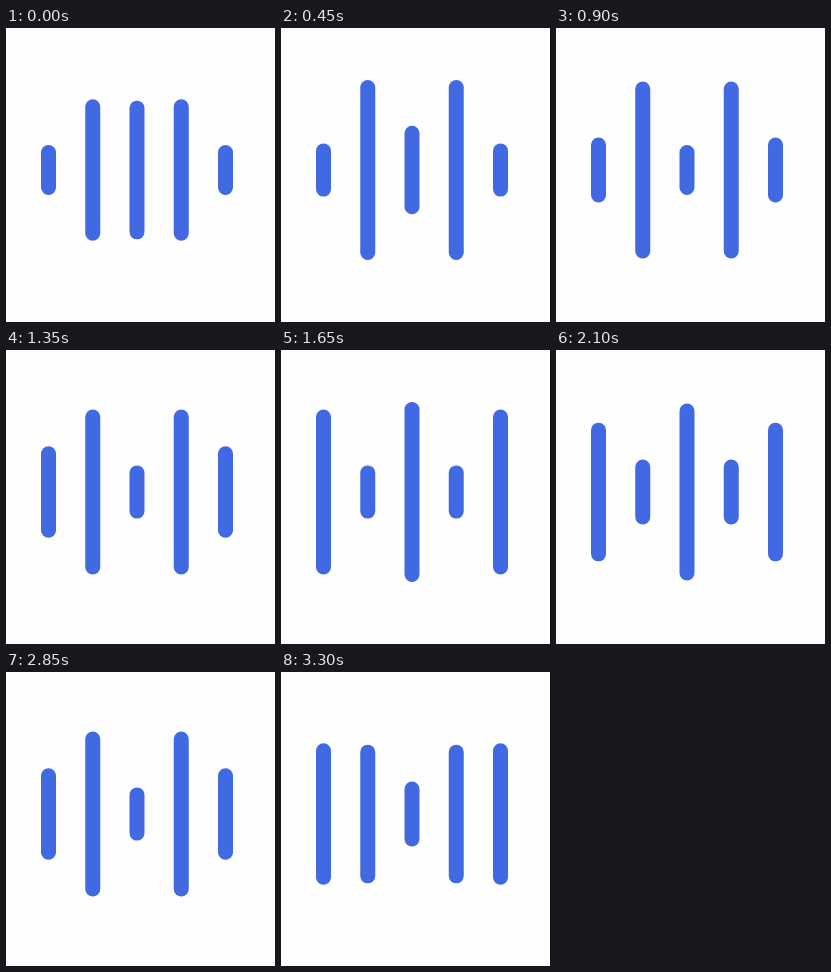
An HTML page that plays this animation: 269x294 px, repeating every 3320 ms.

```html
<!DOCTYPE html>
<html lang="en">
<head>
<meta charset="utf-8">
<title>Audio bars</title>
<style>
  html, body { margin: 0; width: 100%; height: 100%; overflow: hidden; background: #fefefe; }
  svg { display: block; }
  rect { fill: #4169e1; }
</style>
</head>
<body>
<svg id="stage" width="269" height="294" viewBox="0 0 269 294"></svg>
<script>
  const LOOP = 3320, STEP = 150, PERIOD = 500;
  const MIN = 50, MAX = 180, MID = 142, WIDTH = 15, LEFT = 35, GAP = 44.25;
  const DELAYS = [750, 450, 150, 450, 750];

  // The CSS "ease" curve, cubic-bezier(.25, .1, .25, 1)
  function ease(x) {
    const bezier = (a, b, u) => 3 * a * u * (1 - u) ** 2 + 3 * b * u * u * (1 - u) + u ** 3;
    let lo = 0, hi = 1;
    for (let i = 0; i < 40; i++) {
      const mid = (lo + hi) / 2;
      if (bezier(.25, .25, mid) < x) lo = mid; else hi = mid;
    }
    return bezier(.1, 1, lo);
  }

  // Shrinks for half a period, then grows back
  function heightAt(time) {
    const phase = ((time % PERIOD + PERIOD) % PERIOD) / PERIOD * 2;
    const size = phase < 1 ? 1 - ease(phase) : ease(phase - 1);
    return MIN + (MAX - MIN) * size;
  }

  function pose(time, delay, offset) {
    const h = heightAt(time - delay);
    return { offset, y: `${MID - h / 2}px`, height: `${h}px`, easing: 'step-end' };
  }

  const stage = document.getElementById('stage');
  const bars = DELAYS.map((delay, i) => {
    const bar = document.createElementNS('http://www.w3.org/2000/svg', 'rect');
    bar.setAttribute('x', LEFT + GAP * i);
    bar.setAttribute('width', WIDTH);
    bar.setAttribute('rx', WIDTH / 2);
    stage.append(bar);

    const frames = [];
    let time = 0;
    for (; time < LOOP; time += STEP) frames.push(pose(time, delay, time / LOOP));
    frames.push(pose(time - STEP, delay, 1));
    return { bar, frames };
  });

  for (const { bar, frames } of bars) {
    bar.animate(frames, { duration: LOOP, iterations: Infinity }).startTime = 0;
  }
</script>
</body>
</html>
```
